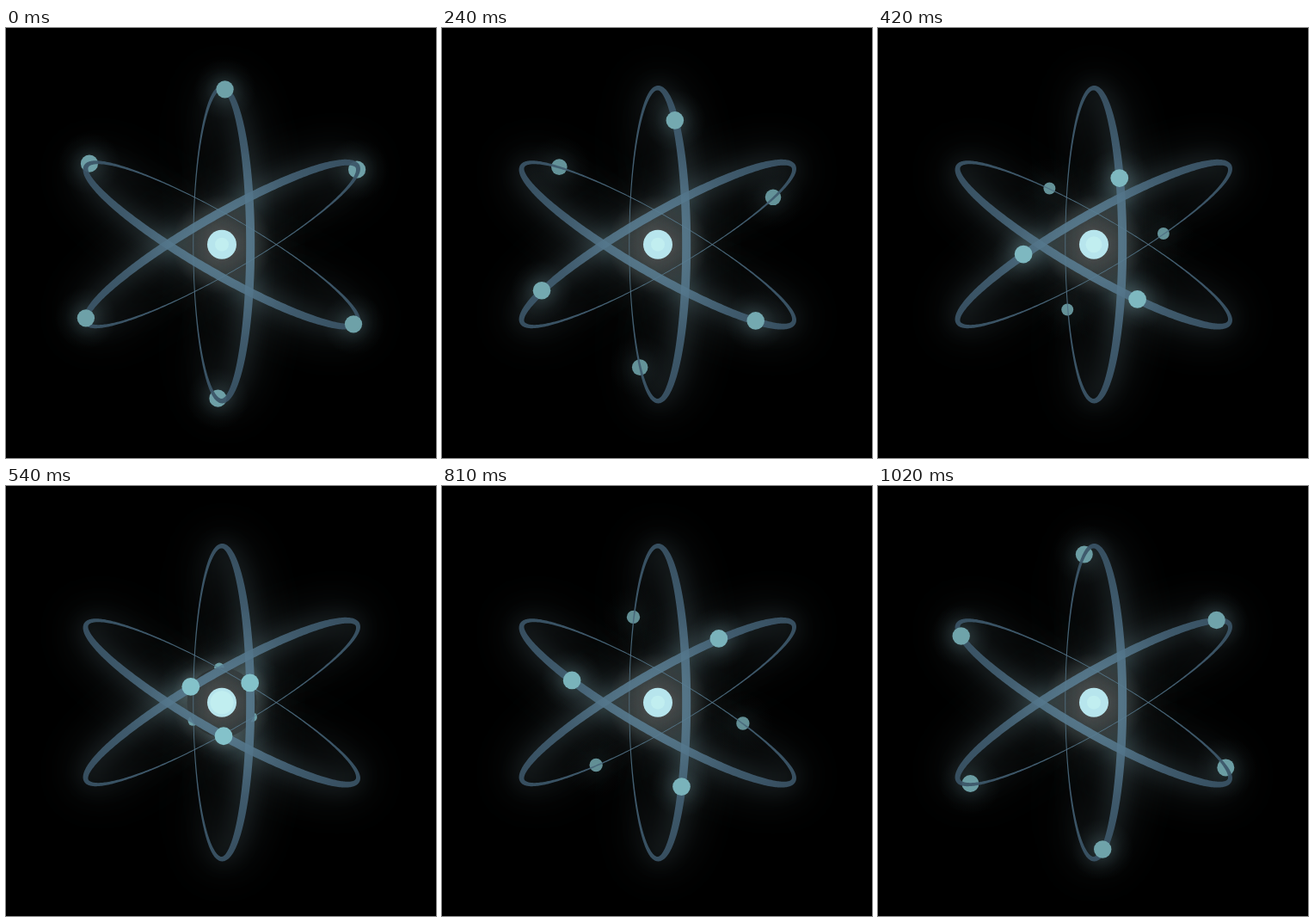
An HTML page with a canvas that plays this animation: 500x500 px, repeating every 1.05 s.

```html
<!DOCTYPE html>
<html lang="en">
<head>
<meta charset="utf-8">
<title>Atom</title>
<style>
html, body { margin: 0; width: 100%; height: 100%; overflow: hidden; background: #000; }
canvas { display: block; width: 500px; height: 500px; }
</style>
</head>
<body>
<canvas id="stage" width="500" height="500"></canvas>
<script>
const SIZE = 500, CX = 251, CY = 251.7, TAU = Math.PI * 2;
const STEP = 30, STEPS = 35;
const TURNS = [0, 1, 2].map(i => i * TAU / 3);
const RING = { rx: 33.2, ry: 182, width: 5.4, taper: 4.6 };
const PATH = { x: 250.5, y: 251, rx: 33.4, ry: 181 };
const HALO = 40.5;

// [step, angle in degrees] along one half of an orbit
const KEYS = [[0, 7], [8, 37.5], [14, 65], [18, 83], [22, 101], [27, 123], [34, 161.3]];

const ctx = document.getElementById('stage').getContext('2d');

function layer(paint) {
  const c = document.createElement('canvas');
  c.width = c.height = SIZE;
  paint(c.getContext('2d'));
  return c;
}

// One edge of a ring, offset along the ellipse's normal by half its local width
function edge(g, side) {
  const { rx, ry, width, taper } = RING;
  const n = 360;
  for (let i = 0; i < n; i++) {
    const c = Math.cos(i / n * TAU), s = Math.sin(i / n * TAU);
    const len = Math.hypot(ry * c, rx * s);
    const half = side * (width + taper * c) / 2;
    const x = rx * c + half * ry * c / len;
    const y = ry * s + half * rx * s / len;
    if (i) g.lineTo(x, y); else g.moveTo(x, y);
  }
  g.closePath();
}

function ring(g, turn, dx = 0) {
  g.save();
  g.translate(CX + dx, CY);
  g.rotate(turn);
  g.beginPath();
  edge(g, 1);
  edge(g, -1);
  g.restore();
  g.fill('evenodd');
}

function disc(g, x, y, r, color) {
  g.fillStyle = color;
  g.beginPath();
  g.arc(x, y, r, 0, TAU);
  g.fill();
}

function radial(g, x, y, r, stops) {
  const grad = g.createRadialGradient(x, y, 0, x, y, r);
  stops.forEach(([at, color]) => grad.addColorStop(at, color));
  return grad;
}

const glow = layer(g => {
  g.fillStyle = '#000';
  g.fillRect(0, 0, SIZE, SIZE);
  g.globalCompositeOperation = 'lighter';
  g.shadowOffsetX = 2000;
  for (const [blur, color] of [[24, 'rgba(108,138,148,.34)'], [54, 'rgba(108,134,140,.72)']]) {
    g.shadowBlur = blur;
    g.shadowColor = color;
    TURNS.forEach(turn => ring(g, turn, -2000));
  }
  g.shadowColor = 'transparent';
  disc(g, CX, CY, 58, radial(g, CX, CY, 58, [
    [0, 'rgb(54,51,49)'], [0.3, 'rgb(46,44,43)'],
    [0.55, 'rgb(24,23,22)'], [1, 'rgb(0,0,0)']
  ]));
});

const rings = layer(g => {
  g.fillStyle = radial(g, CX, CY, 190, [
    [0, 'rgba(94,132,153,.88)'], [0.32, 'rgba(85,119,140,.88)'],
    [0.6, 'rgba(68,97,117,.9)'], [1, 'rgba(57,82,100,.93)']
  ]);
  TURNS.forEach(turn => ring(g, turn));
});

function angleAt(s) {
  const slope = i => {
    const a = KEYS[Math.max(i - 1, 0)], b = KEYS[Math.min(i + 1, KEYS.length - 1)];
    return (b[1] - a[1]) / (b[0] - a[0]);
  };
  let i = 0;
  while (i < KEYS.length - 2 && s > KEYS[i + 1][0]) i++;
  const [x0, y0] = KEYS[i], [x1, y1] = KEYS[i + 1];
  const w = x1 - x0, u = (s - x0) / w, v = 1 - u;
  return y0 * (1 + 2 * u) * v * v + slope(i) * w * u * v * v
       + y1 * u * u * (3 - 2 * u) - slope(i + 1) * w * u * u * v;
}

function electrons(angle, front) {
  const side = front ? 1 : -1;
  const depth = Math.sin(angle);
  const lx = side * PATH.rx * depth;
  const ly = -side * PATH.ry * Math.cos(angle);
  const near = Math.max(0, 1 - Math.hypot(lx, ly) / 180);
  const r = front ? 10.1 + 0.3 * depth : 10.1 - 4.4 * depth ** 3.4;
  const light = front ? 1 + 0.26 * near : 1 - 0.28 * depth ** 2 + 0.46 * near * near;
  const color = `rgb(${[110, 161, 168].map(c => Math.round(c * light))})`;
  const spots = TURNS.map(turn => {
    const c = Math.cos(turn), s = Math.sin(turn);
    return [PATH.x + lx * c - ly * s, PATH.y + lx * s + ly * c];
  });
  return { spots, r, color, shine: front ? 0.2 : 0.2 - 0.15 * depth };
}

function paintGlow({ spots, shine }) {
  ctx.globalCompositeOperation = 'lighter';
  for (const [x, y] of spots) {
    disc(ctx, x, y, 36, radial(ctx, x, y, 36, [
      [0, `rgba(110,150,158,${shine})`], [0.3, `rgba(110,150,158,${shine * 0.75})`],
      [0.65, `rgba(110,150,158,${shine * 0.25})`], [1, 'rgba(110,150,158,0)']
    ]));
  }
  ctx.globalCompositeOperation = 'source-over';
}

function paintBodies({ spots, r, color }) {
  for (const [x, y] of spots) disc(ctx, x, y, r, color);
}

function draw(ms) {
  const step = Math.floor(ms / STEP) % STEPS;
  const angle = angleAt(step) * Math.PI / 180;
  const front = electrons(angle, true), back = electrons(angle, false);
  ctx.drawImage(glow, 0, 0);

  // the halo hides far electrons
  ctx.save();
  ctx.beginPath();
  ctx.rect(0, 0, SIZE, SIZE);
  ctx.moveTo(CX + HALO, CY);
  ctx.arc(CX, CY, HALO, 0, TAU);
  ctx.clip('evenodd');
  paintGlow(back);
  paintGlow(front);
  paintBodies(back);
  ctx.restore();

  ctx.drawImage(rings, 0, 0);
  const pulse = Math.exp(-(((step - 18) / 3.5) ** 2));
  disc(ctx, CX, CY, 17, '#b7e5ed');
  disc(ctx, CX, CY, 8 + 5.5 * pulse, '#c1eef0');
  paintBodies(front);
}

const start = performance.now();
function tick() {
  draw(Math.max(0, performance.now() - start));
  requestAnimationFrame(tick);
}
draw(0);
requestAnimationFrame(tick);
</script>
</body>
</html>
```
